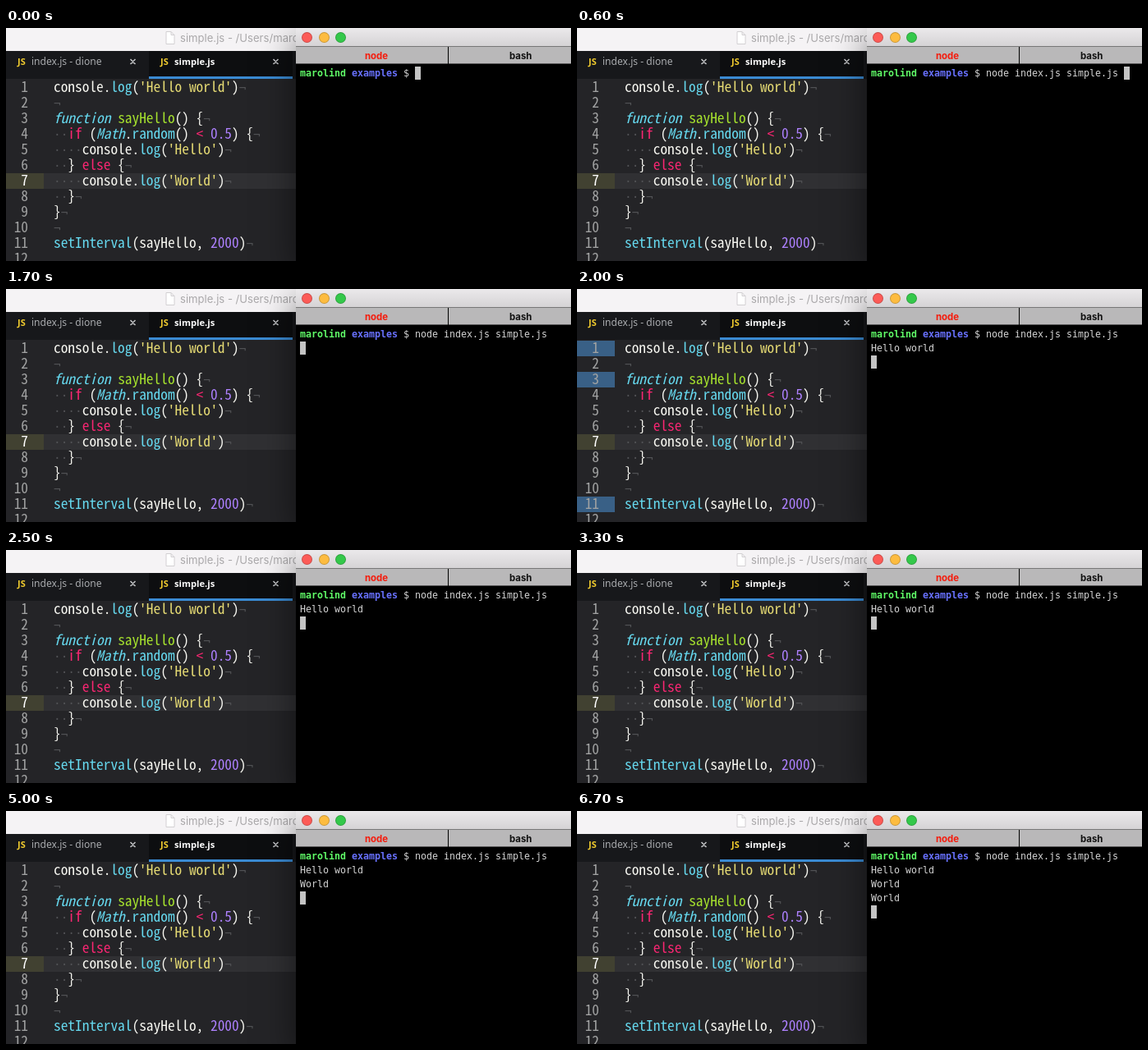
These frames come from a looping animation (688 px wide and 284 px high, 8 s). An HTML page:

```html
<!DOCTYPE html>
<html lang="en">
<head>
<meta charset="utf-8">
<title>Editor and terminal</title>
<style>
html, body { margin: 0; width: 100%; height: 100%; overflow: hidden; background: #000; }
.stage, .stage div, .stage svg, pre { position: absolute; top: 0; left: 0; margin: 0; }
.stage { width: 688px; height: 284px; overflow: hidden; }

/* editor */
.editor { width: 353px; height: 284px; background: #242427; overflow: hidden; }
.bar { width: 353px; height: 28px; background: #f5f3f5; }
.stage .title { left: 212px; top: 2px; font: 13.1px/20px Inter, sans-serif; color: #aaa8aa; white-space: nowrap; }
.stage .tabs { top: 28px; width: 353px; height: 34px; background: #17181b; }
.tab { width: 174px; height: 34px; font: 12.1px/25px "Noto Sans", sans-serif; color: #a9abae; white-space: nowrap; }
.stage .on { left: 174px; width: 175px; background: #0d0e10; color: #fff; font-weight: 600; font-size: 11.2px; }
.on::after { content: ""; position: absolute; left: 0; bottom: 0; width: 100%; height: 3px; background: #3a8ad2; }
.stage .js { left: 14px; color: #f0cb2e; font-weight: 800; font-size: 11px; }
.stage .name { left: 31px; }
.stage .line { top: 177px; left: 46px; width: 307px; height: 19px; background: #303033; }
.mark { width: 46px; height: 19px; }
.stage .here { top: 177px; background: #414131; }
.run { background: #396086; opacity: 0; animation: 8s step-end infinite; }
.boot { animation-name: boot; }
.tick { animation-name: tick; }
.stage pre { top: 61px; font: 17.36px/19px "Noto Sans Mono CJK JP", "Noto Sans Mono CJK SC", monospace; }
.nums { width: 27px; text-align: right; color: #a2a3a3; }
.nums b { font-weight: 400; color: #fff; }
.stage .code { left: 58px; color: #f8f8f2; }
.code i { font: 14.42px/1px "DejaVu Sans Mono", monospace; color: #515255; }
.c { color: #66d9ef; } .g { color: #a6e22e; } .p { color: #f92672; }
.s { color: #e6db74; } .n { color: #ae81ff; } em { color: #66d9ef; }

/* terminal */
.stage .term { left: 353px; width: 335px; height: 284px; background: #000; box-shadow: 0 14px 40px #0008; }
.head { width: 335px; height: 22px; background: linear-gradient(#ebe9eb, #d5d3d5); border-bottom: 1px solid #777; }
.stage .dot { top: 5px; width: 11px; height: 11px; border-radius: 50%; border: .5px solid #0003; }
.stage .pane { top: 23px; width: 185px; height: 20px; background: #b9b8b9; border-bottom: 1px solid #555; font: 700 11.4px/22px Inter, sans-serif; }
.stage .two { left: 186px; }
.stage .out { left: 5px; font: 11.63px/17px "DejaVu Sans Mono", monospace; color: #d4d4d4; white-space: pre; }
.out b:first-child { color: #5ff967; } .out b + b { color: #6871ff; }
.cmd, .log { opacity: 0; animation: 8s step-end infinite; }
.cmd { animation-name: cmd; }
.stage .caret { left: 5px; top: 47px; width: 7px; height: 16px; background: #c4c4c4; animation: caret 8s step-end infinite; }

@keyframes cmd { 3.75%, 100% { opacity: 1; } }
@keyframes caret {
  0% { transform: translate(140px, 0); }
  3.75% { transform: translate(308px, 0); }
  18.75% { transform: translate(0, 17px); }
  25% { transform: translate(0, 34px); }
  50% { transform: translate(0, 51px); }
  75%, 100% { transform: translate(0, 68px); }
}
@keyframes boot { 25% { opacity: 1; } 31.25% { opacity: 0; } }
@keyframes tick { 50%, 75% { opacity: 1; } 56.25%, 81.25% { opacity: 0; } }
@keyframes log1 { 25%, 100% { opacity: 1; } }
@keyframes log2 { 50%, 100% { opacity: 1; } }
@keyframes log3 { 75%, 100% { opacity: 1; } }
</style>
</head>
<body>
<div class="stage">
  <div class="editor">
    <div class="bar"></div>
    <svg style="left:194px;top:4px" width="12" height="16"><path d="M1 .5h6l4 4v11H1zM7 .5v4h4" fill="#fff" stroke="#d2d0d2"/></svg>
    <div class="title">simple.js - /Users/marolind</div>
    <div class="tabs">
      <div class="tab"><div class="js">JS</div><div class="name">index.js - dione</div></div>
      <div class="tab on"><div class="js">JS</div><div class="name">simple.js</div></div>
      <svg width="353" height="34"><path d="M151.5 10l6 6m0-6l-6 6M325.5 10l6 6m0-6l-6 6" stroke="#c4c5c7" stroke-width="1.5"/></svg>
    </div>
    <div class="line"></div>
    <div class="mark here"></div>
    <div class="mark run boot" style="top:63px"></div>
    <div class="mark run boot" style="top:101px"></div>
    <div class="mark run boot" style="top:253px"></div>
    <div class="mark run tick" style="top:120px"></div>
    <div class="mark run tick" style="top:177px"></div>
    <pre class="nums">1
2
3
4
5
6
<b>7</b>
8
9
10
11
12</pre>
    <pre class="code">console.<span class="c">log</span>(<span class="s">'Hello world'</span>)<i>¬</i>
<i>¬</i>
<em>function</em> <span class="g">sayHello</span>() {<i>¬</i>
<i>··</i><span class="p">if</span> (<em>Math</em>.<span class="c">random</span>() <span class="p">&lt;</span> <span class="n">0.5</span>) {<i>¬</i>
<i>····</i>console.<span class="c">log</span>(<span class="s">'Hello'</span>)<i>¬</i>
<i>··</i>} <span class="p">else</span> {<i>¬</i>
<i>····</i>console.<span class="c">log</span>(<span class="s">'World'</span>)<i>¬</i>
<i>··</i>}<i>¬</i>
}<i>¬</i>
<i>¬</i>
<span class="c">setInterval</span>(sayHello, <span class="n">2000</span>)<i>¬</i></pre>
  </div>
  <div class="term">
    <div class="head"></div>
    <div class="dot" style="left:7px;background:#fc5b57"></div>
    <div class="dot" style="left:27.5px;background:#fdbc40"></div>
    <div class="dot" style="left:48px;background:#34c84a"></div>
    <div class="pane" style="color:#f51b0c;text-indent:84px">node</div>
    <div class="pane two" style="color:#111;text-indent:74px">bash</div>
    <div class="caret"></div>
    <div class="out" style="top:47px"><b>marolind</b> <b>examples</b> $ <span class="cmd">node index.js simple.js</span></div>
    <div class="out log" style="top:64px;animation-name:log1">Hello world</div>
    <div class="out log" style="top:81px;animation-name:log2">World</div>
    <div class="out log" style="top:98px;animation-name:log3">World</div>
  </div>
</div>
</body>
</html>
```
